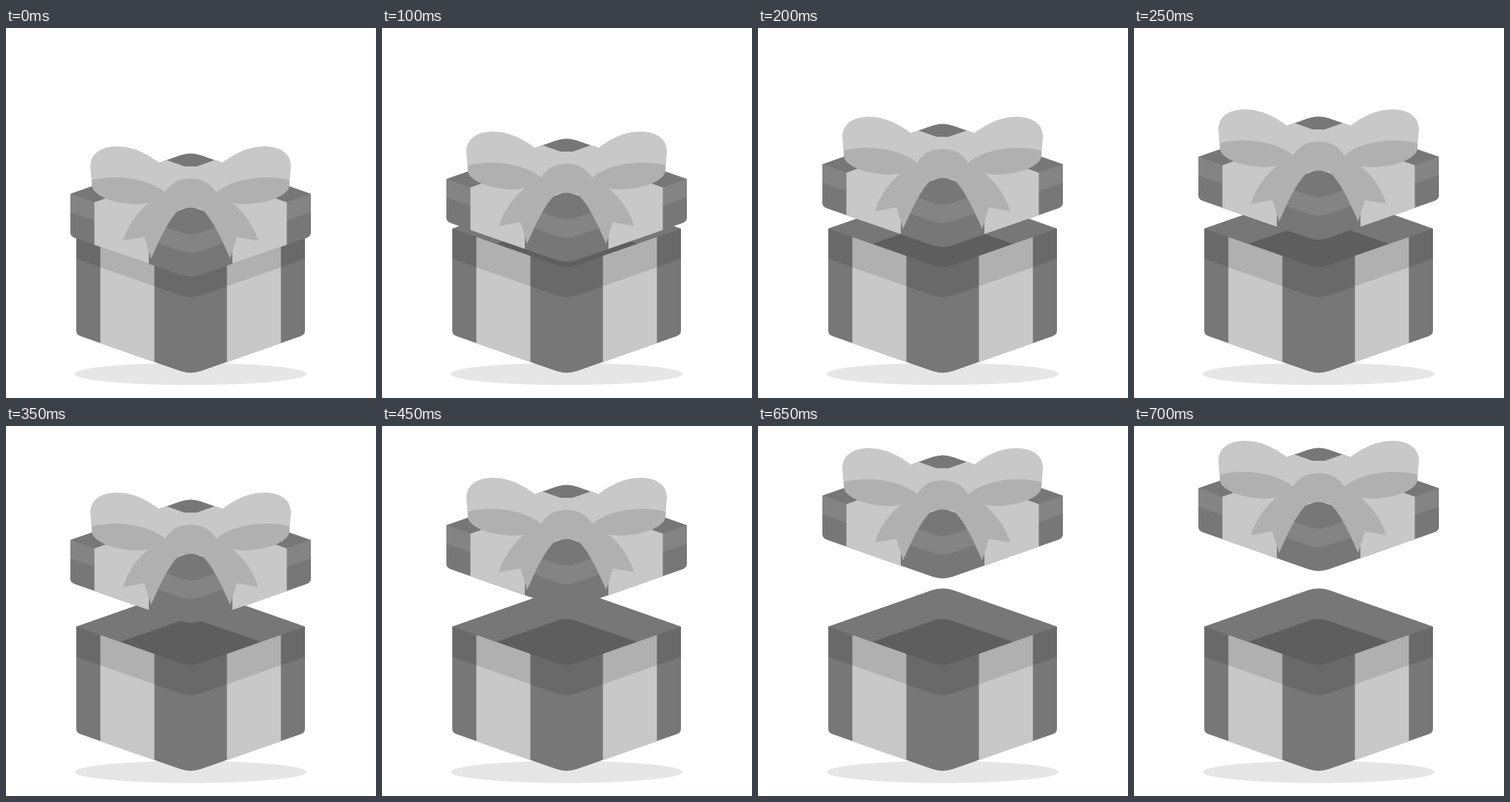
Write an HTML page that moves like this. It is 500 px wide and 500 px high and loops after 0.75 s.

```html
<!DOCTYPE html>
<html lang="en">
<head>
<meta charset="utf-8">
<title>Gift box</title>
<style>
  html, body { margin: 0; width: 100%; height: 100%; overflow: hidden; background: #fff; }
  svg { display: block; width: 100%; height: 100%; }
  .dark { fill: #777; }
  .light { fill: #c8c8c8; }
  .mid { fill: #b0b0b0; }
  .inside { fill: #5e5e5e; }
</style>
</head>
<body>
<svg viewBox="0 0 500 500">
  <defs>
    <path id="boxRibbon" d="M127.5 282.4 200.5 307.9V451.4L127.5 425.9Z"/>
    <path id="lidRibbon" d="M119.5 235.4 282 178.5 355 204 193 261V318.6L119.5 292.9Z"/>
    <g id="loop">
      <path class="light" d="M116 213 114 187C114 170 128 160 150 160C173 160 192 171 208 183L216 222Z"/>
      <path class="mid" d="M116 206C124 203 136 202 147 202C175 202 199 209 215 222C206 232 195 238 178 238C150 238 118 228 116 213Z"/>
    </g>
  </defs>

  <ellipse cx="249.5" cy="467.5" rx="156.5" ry="15" fill="#e6e6e6"/>

  <path class="dark" d="M95 271 235.5 221.8Q249.5 217 263.5 221.8L404 271V409Q404 414.5 398 416.6L263.5 463.6Q249.5 468.5 235.5 463.6L101 416.6Q95 414.5 95 409Z"/>
  <path class="inside" d="M154 291.8 235.5 263.4Q249.5 258.5 263.5 263.4L345 291.8 263.5 320.2Q249.5 325 235.5 320.2Z"/>
  <use href="#boxRibbon" class="light"/>
  <use href="#boxRibbon" class="light" transform="matrix(-1 0 0 1 499 0)"/>
  <path opacity=".12" d="M95 271 235.5 320.2Q249.5 325 263.5 320.2L404 271V312L263.5 361.2Q249.5 366 235.5 361.2L95 312Z"/>

  <g id="lid">
    <path class="dark" d="M87 224 235.5 172Q249.5 167 263.5 172L412 224V277Q412 281.5 405 284L263.5 333.5Q249.5 338.4 235.5 333.5L94 284Q87 281.5 87 277Z"/>
    <path fill="#848484" d="M87 224 235.5 276Q249.5 281 263.5 276L412 224V249L263.5 301Q249.5 306 235.5 301L87 249Z"/>
    <use href="#lidRibbon" class="light"/>
    <use href="#lidRibbon" class="light" transform="matrix(-1 0 0 1 499 0)"/>
    <path class="light" d="M213 222C213 193 228 187 249.5 187S286 193 286 222Z"/>
    <use href="#loop"/>
    <use href="#loop" transform="matrix(-1 0 0 1 499 0)"/>
    <path class="mid" d="M215 222C224 208 235 203.500 249.500 203.500S275 208 284 222C310 235 331 257 341 287.500L312 282.500 303 311.500C292 288 282 262 264.500 244.500Q249.500 241 234.500 244.500C217 262 207 288 196 311.500L187 282.500 158 287.500C168 257 189 235 215 222Z"/>
  </g>
</svg>
<script>
  const LOOP = 750, STEP = 50, RISE = 10;
  const lid = document.getElementById('lid');

  function draw() {
    const step = Math.floor(performance.now() % LOOP / STEP);
    lid.setAttribute('transform', `translate(0 ${-step * RISE})`);
    requestAnimationFrame(draw);
  }
  draw();
</script>
</body>
</html>
```
